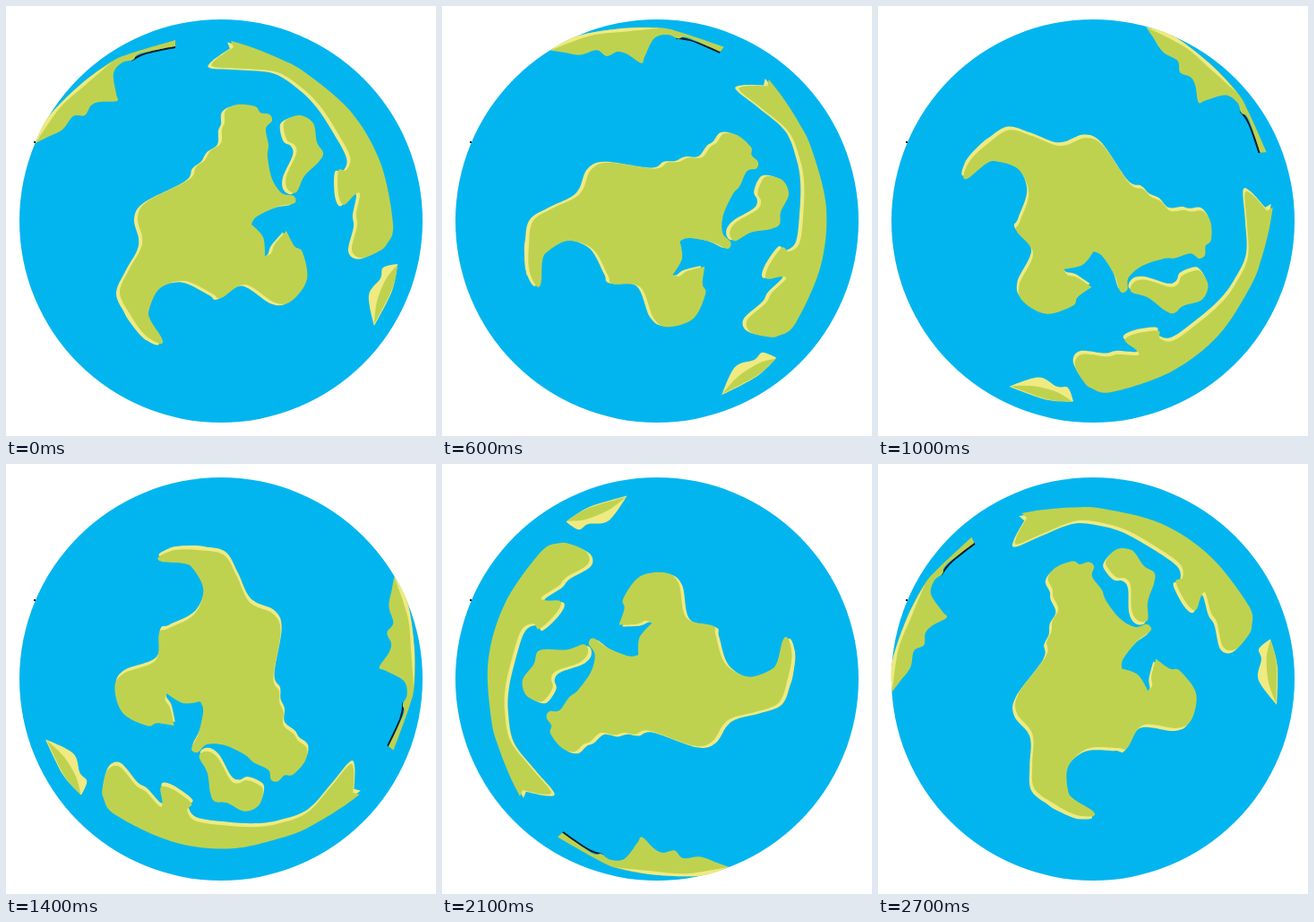
Write an HTML page with a canvas that moves like this. It is 480 by 480 pixels and loops after 2800 ms.

```html
<!DOCTYPE html>
<html lang="en">
<head>
<meta charset="utf-8">
<title>Spinning globe</title>
<style>
html, body { margin: 0; width: 100%; height: 100%; overflow: hidden; background: #fff; }
canvas { display: block; }
</style>
</head>
<body>
<canvas id="stage" width="480" height="480"></canvas>
<script>
const ctx = document.getElementById('stage').getContext('2d');
const SEA = '#03b5ef', LAND = '#bfd24f', SHORE = '#efea82', DARK = '#0b1c2c';
const LOOP = 2800, STEP = 100;

// Closed smooth curve through "x,y" points; "!" marks a sharp corner.
function blob(text) {
  const pts = text.trim().split(/\s+/).map(word => {
    const [x, y] = word.replace('!', '').split(',').map(Number);
    return { x, y, sharp: word.endsWith('!') };
  });
  const at = i => pts[(i + pts.length) % pts.length];
  const slope = (i, axis) => at(i).sharp ? 0 : (at(i + 1)[axis] - at(i - 1)[axis]) / 6;
  const path = new Path2D();
  path.moveTo(pts[0].x, pts[0].y);
  pts.forEach((p, i) => {
    const q = at(i + 1);
    path.bezierCurveTo(p.x + slope(i, 'x'), p.y + slope(i, 'y'),
      q.x - slope(i + 1, 'x'), q.y - slope(i + 1, 'y'), q.x, q.y);
  });
  path.closePath();
  return path;
}

const mainland = blob(`245,117 258,110 278,112 284,119 294,121 297,128 290,137
  293,155 292,168 297,193 308,209 321,212 322,220 303,224 280,235 274,244! 287,258
  289,279! 296,276 300,266 313,251! 322,268 331,275 336,305 319,329 300,331
  267,311 240,326 230,321 200,307 172,315 160,338 161,350 174,371 172,377
  155,367 139,345 127,320 137,295 150,272 152,258 147,236 158,218
  204,194 212,180 222,172 228,162 240,153 241,138 244,130`);

const island = blob(`312,128 328,122 343,131 347,152 354,164 349,174 333,190
  324,208 314,204 313,190 324,165 322,155 314,150 310,137`);

const crescent = blob(`251,39! 274,46 306,59 335,75 385,118 418,175 432,243
  425,266 414,275 396,281 386,272 392,245 391,232 395,210 389,211 377,222
  371,210 371,184 380,183 384,168 368,138 350,111 331,92 303,74 265,70
  232,68 234,60 254,46!`);

const coast = blob(`33,153! 48,123 84,87 118,62 142,52 189,38! 189,45! 150,53 142,60
  130,63 120,75 123,98 124,106 105,107 95,111 88,122 75,123 63,138 45,147`);
const coastShore = blob('33,153! 48,123 84,87 119,62! 90,87 60,114');
const coastShadow = blob('140,62! 150,54 189,44! 189,47! 156,54');

const cape = blob('437,288! 421,292 418,304 405,323 411,357! 431,318');
const capeLand = blob('437,289! 424,305 414,330 411,355! 431,316');
const tipShore = blob('124,318! 135,348 157,374! 140,346');

function fill(path, color) {
  ctx.fillStyle = color;
  ctx.fill(path);
}

function shored(path) {
  ctx.save();
  ctx.translate(-4, 1.5);
  fill(path, SHORE);
  ctx.restore();
  fill(path, LAND);
}

// [step, degrees, degrees per step]
const keys = [[0, 0, 2.5], [6, 35.2, 9.5], [10, 82.5, 11.4], [14, 126.6, 11.7],
  [17, 164.7, 13.9], [21, 226.3, 16.5], [27, 333.6, 19.5]];

function angleAt(step) {
  const i = Math.max(1, keys.findIndex(k => k[0] >= step));
  const [s0, a0, v0] = keys[i - 1], [s1, a1, v1] = keys[i];
  const d = s1 - s0, u = (step - s0) / d, w = 1 - u;
  return a0 * w * w * (1 + 2 * u) + a1 * u * u * (1 + 2 * w) + d * u * w * (v0 * w - v1 * u);
}

function draw(now) {
  const step = Math.floor(now % LOOP / STEP);
  ctx.fillStyle = '#fff';
  ctx.fillRect(0, 0, 480, 480);
  ctx.fillStyle = SEA;
  ctx.beginPath();
  ctx.arc(240, 240, 225, 0, 2 * Math.PI);
  ctx.fill();
  ctx.fillStyle = DARK;
  ctx.fillRect(31, 151, 2, 2);

  ctx.save();
  ctx.translate(240, 240);
  ctx.rotate(angleAt(step) * Math.PI / 180);
  ctx.translate(-240, -240);
  fill(tipShore, SHORE);
  [mainland, island, crescent].forEach(shored);
  fill(coastShadow, DARK);
  fill(coast, LAND);
  fill(coastShore, SHORE);
  fill(cape, SHORE);
  fill(capeLand, LAND);
  ctx.restore();
}

const start = performance.now();
function tick() {
  draw(performance.now() - start);
  requestAnimationFrame(tick);
}
tick();
</script>
</body>
</html>
```
